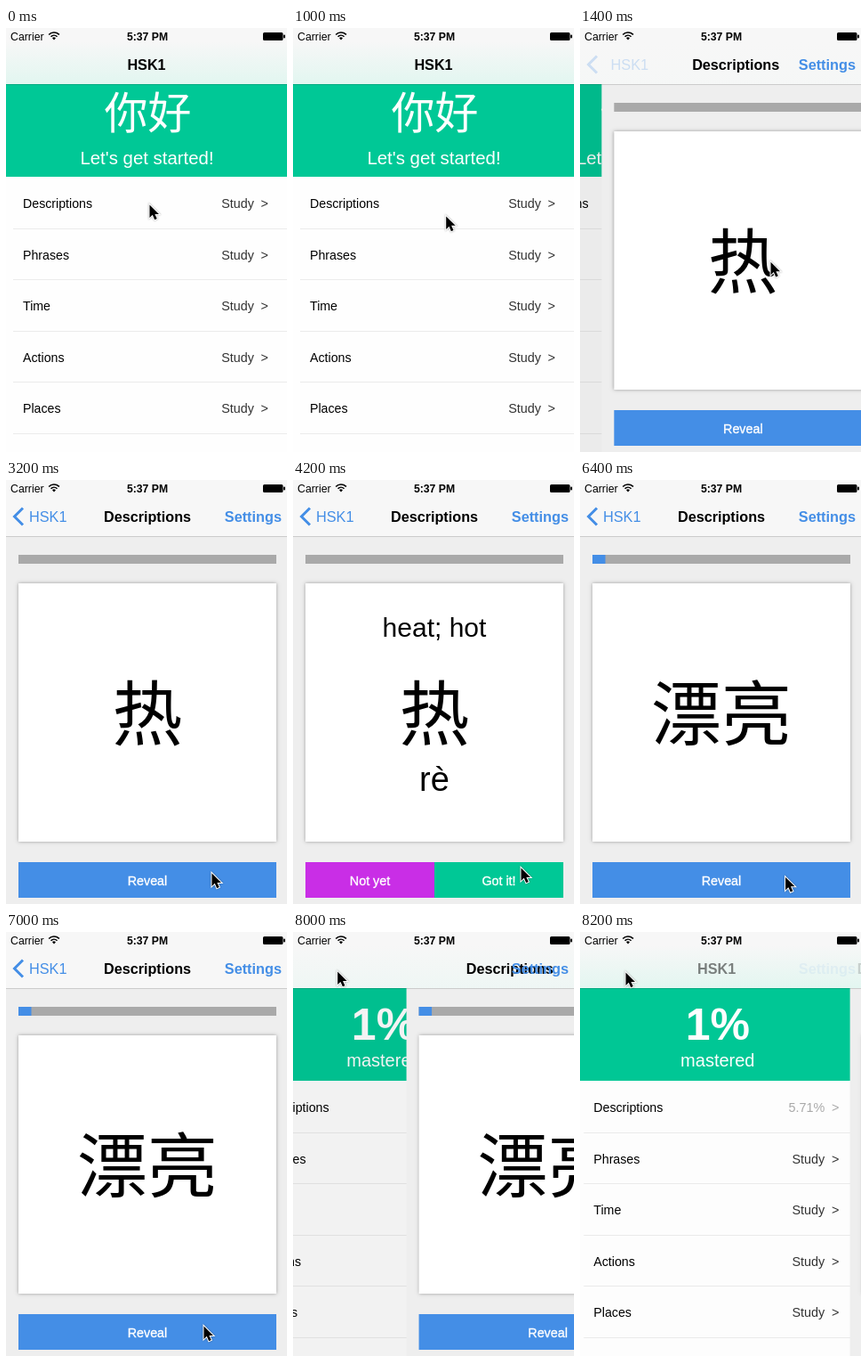
Animation, 316 px wide and 476 px high, one loop 8400 ms. Source, as an HTML page with a canvas:

```html
<!DOCTYPE html>
<html lang="zh-CN">
<head>
<meta charset="utf-8">
<title>Vocabulary app</title>
<style>
  html, body { margin: 0; width: 100%; height: 100%; overflow: hidden; background: #eee; }
  canvas { display: block; }
</style>
</head>
<body>
<canvas id="stage" width="316" height="476"></canvas>
<script>
const ctx = document.getElementById('stage').getContext('2d');
const W = 316, H = 476, LOOP = 8400, NAV = 63;
const GREEN = '#00c896', BLUE = '#448ee6', PURPLE = '#c92ee6';
const LATIN = '"Liberation Sans", Arial, sans-serif';
const HAN = '"Noto Sans CJK SC", "Noto Sans CJK", sans-serif';
const PUSH = 1170, POP = 7925;

const CARDS = [
  { start: 0, reveal: 3600, han: '热', meaning: 'heat; hot', pinyin: 'rè' },
  { start: 4600, reveal: 5800, han: '冷', meaning: 'cold', pinyin: 'lěng' },
  { start: 6400, reveal: LOOP, han: '漂亮' },
];

// Pointer stops: time, x, y
const POINTER = [
  [0, 161, 198], [900, 161, 198], [1400, 214, 262], [2200, 238, 464],
  [3200, 231, 441], [3500, 231, 441], [4200, 256, 435], [4500, 256, 435],
  [5600, 227, 461], [5700, 227, 461], [6000, 232, 446], [6300, 232, 446],
  [7000, 222, 442], [7150, 222, 442], [7750, 48, 43], [8200, 51, 45], [LOOP, 51, 45],
];

function spring(ms) {
  const x = Math.max(0, ms) * 0.01825;
  return 1 - (1 + x) * Math.exp(-x);
}

function rect(color, x, y, w, h) {
  ctx.fillStyle = color;
  ctx.fillRect(x, y, w, h);
}

function text(str, x, y, size, { color = '#000', align = 'left', weight = 400, family = LATIN, alpha = 1, stroke = 0 } = {}) {
  ctx.save();
  ctx.globalAlpha = alpha;
  ctx.font = `${weight} ${size}px ${family}`;
  ctx.textAlign = align;
  ctx.fillStyle = ctx.strokeStyle = color;
  ctx.fillText(str, x, y);
  if (stroke) {
    ctx.lineWidth = stroke;
    ctx.strokeText(str, x, y);
  }
  ctx.restore();
}

function drawList(finished) {
  const center = { color: '#fff', align: 'center' };
  rect('#fefefe', 0, 0, W, H);
  rect(GREEN, 0, NAV, W, 104);
  if (finished) {
    text('1%', 158.5, 121, 50, { ...center, weight: 700 });
    text('mastered', 158.5, 151, 20, center);
  } else {
    text('你好', 159.5, 113, 49, { ...center, family: HAN });
    text("Let's get started!", 158.5, 153, 20.4, center);
  }
  ['Descriptions', 'Phrases', 'Time', 'Actions', 'Places'].forEach((name, i) => {
    const y = 167 + i * 57.5;
    const done = finished && i === 0;
    const right = { color: done ? '#aaa' : '#333', align: 'right' };
    text(name, 19, y + 35, 14.2);
    text(done ? '5.71%' : 'Study', 279, y + 35, 14.4, right);
    text('>', 295, y + 35, 14.4, right);
    rect('#ebebeb', 8, Math.round(y + 57.5), W, 1);
  });
}

function button(label, color, x, w) {
  rect(color, x, 429, w, 40);
  text(label, x + w / 2, 455, 14.3, { color: '#fff', align: 'center', stroke: 0.35 });
}

function drawStudy(t) {
  const index = CARDS.findLastIndex(c => t >= c.start);
  const card = CARDS[index];
  rect('#eee', 0, 0, W, H);
  rect('#a9a9a9', 14, 84, 290, 10);
  rect(BLUE, 14, 84, index * 7.25, 10);

  ctx.save();
  ctx.shadowColor = 'rgba(0,0,0,.35)';
  ctx.shadowBlur = 4;
  rect('#fff', 14, 116, 290, 290);
  ctx.restore();

  text(card.han, 159, 292, 79, { align: 'center', family: HAN });
  if (t >= card.reveal) {
    text(card.meaning, 159, 176, 30, { align: 'center' });
    text(card.pinyin, 159, 349, 38, { align: 'center' });
    button('Not yet', PURPLE, 14, 145);
    button('Got it!', GREEN, 159, 145);
  } else {
    button('Reveal', BLUE, 14, 290);
  }
}

function drawStatus() {
  text('Carrier', 5, 13.5, 12.3);
  text('5:37 PM', 159, 13.5, 12.2, { align: 'center', weight: 700 });
  ctx.strokeStyle = '#000';
  ctx.lineWidth = 1.6;
  for (const r of [4.8, 8]) {
    ctx.beginPath();
    ctx.arc(54, 13, r, -Math.PI * 0.76, -Math.PI * 0.24);
    ctx.stroke();
  }
  ctx.fillStyle = '#000';
  ctx.beginPath();
  ctx.moveTo(54, 13.5);
  ctx.arc(54, 13, 2.6, -Math.PI * 0.78, -Math.PI * 0.22);
  ctx.fill();
  ctx.beginPath();
  ctx.roundRect(289, 5, 22.5, 9, 1.5);
  ctx.roundRect(312, 7.5, 2, 4, 1);
  ctx.fill();
}

function drawNav(p) {
  rect('#f7f7f7', 0, 0, W, NAV);
  const tint = ctx.createLinearGradient(0, 15, 0, NAV);
  tint.addColorStop(0, 'rgba(226,246,240,0)');
  tint.addColorStop(1, 'rgb(226,246,240)');
  ctx.globalAlpha = 1 - p;
  rect(tint, 0, 0, W, NAV);
  ctx.globalAlpha = 1;
  rect('rgba(0,0,0,.25)', 0, NAV, W, 0.6);

  const backAlpha = p ** 18;
  const bold = { weight: 700 };
  text('HSK1', 158 - 111 * p, 47, 16.2, { ...bold, align: 'center', alpha: (1 - p) ** 18 });
  text('HSK1', 26 + 111 * (1 - p), 47, 16.3, { color: BLUE, alpha: backAlpha });
  text('Descriptions', 159 + 210 * (1 - p), 47, 16.2, { ...bold, align: 'center', alpha: Math.min(1, p * 4) });
  text('Settings', 310, 47, 16.3, { ...bold, color: BLUE, align: 'right', alpha: Math.min(1, p * 2) });

  ctx.save();
  ctx.globalAlpha = backAlpha;
  ctx.strokeStyle = BLUE;
  ctx.lineWidth = 3;
  ctx.beginPath();
  ctx.moveTo(19, 31.5);
  ctx.lineTo(9.5, 41);
  ctx.lineTo(19, 50.5);
  ctx.stroke();
  ctx.restore();
}

function drawPointer(t) {
  const i = POINTER.findIndex(stop => stop[0] > t);
  const [t0, x0, y0] = POINTER[i - 1], [t1, x1, y1] = POINTER[i];
  const k = (t - t0) / (t1 - t0);
  ctx.save();
  ctx.translate(x0 + (x1 - x0) * k, y0 + (y1 - y0) * k);
  const arrow = new Path2D('M.5 .5V15L3.8 11.8L6.2 17.2L8.8 16.1L6.4 10.9H11Z');
  ctx.lineWidth = 2;
  ctx.strokeStyle = '#fff';
  ctx.shadowColor = 'rgba(0,0,0,.4)';
  ctx.shadowBlur = 2;
  ctx.stroke(arrow);
  ctx.shadowColor = 'transparent';
  ctx.fillStyle = '#000';
  ctx.fill(arrow);
  ctx.restore();
}

function draw(now) {
  const t = now % LOOP;
  const p = t < 4000 ? spring(t - PUSH) : 1 - spring(t - POP);

  ctx.save();
  ctx.translate(-0.3 * W * p, 0);
  drawList(t > 4000);
  ctx.restore();
  rect(`rgba(0,0,0,${0.08 * p})`, 0, 0, W, H);

  ctx.save();
  ctx.translate(W * (1 - p), 0);
  drawStudy(t);
  ctx.restore();

  drawNav(p);
  drawStatus();
  drawPointer(t);
  requestAnimationFrame(draw);
}
requestAnimationFrame(draw);
</script>
</body>
</html>
```
